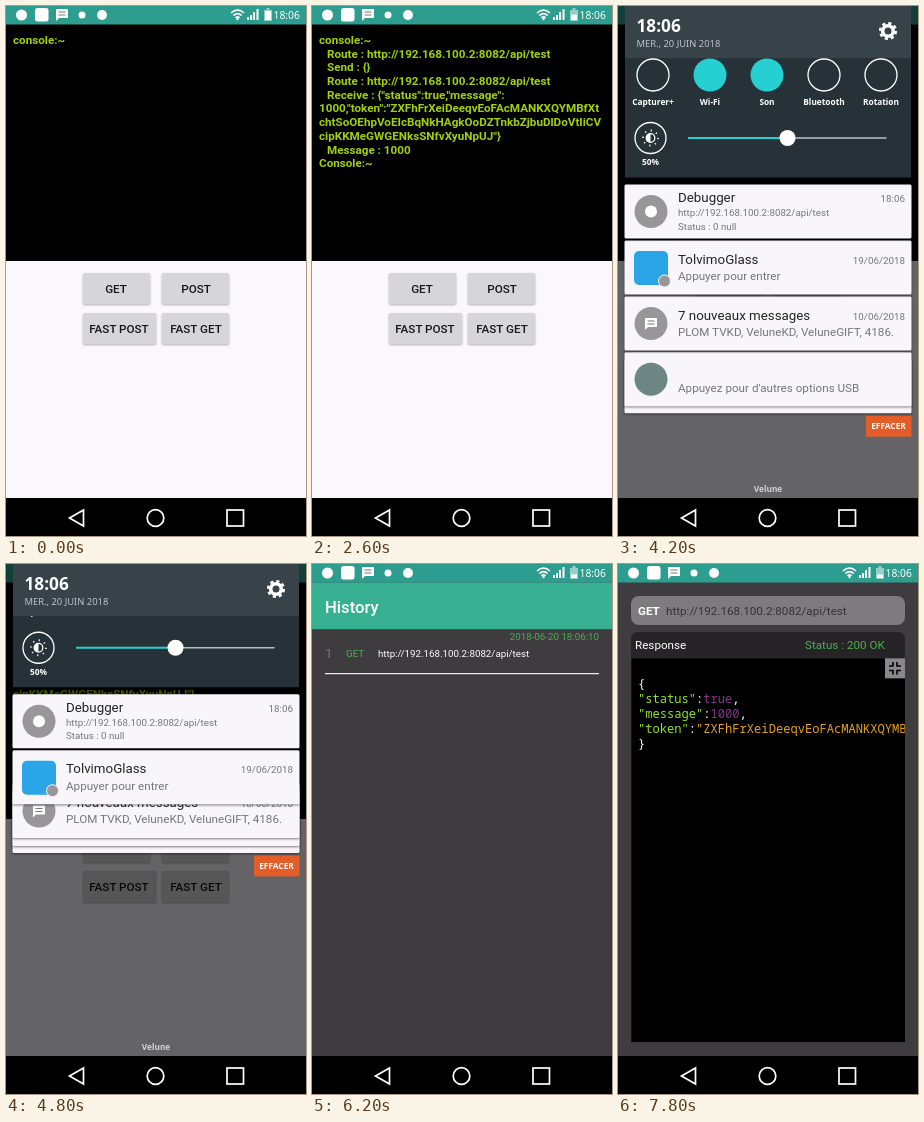
These frames come from a looping animation (300 by 530 pixels, 8 s). An HTML page:

```html
<!DOCTYPE html>
<html lang="fr">
<head>
<meta charset="utf-8">
<title>HTTP debugger</title>
<style>
@property --s { syntax: "<number>"; inherits: true; initial-value: -100; }
html, body { margin: 0; width: 100%; height: 100%; overflow: hidden; background: #000; }
body > svg { display: block; width: 100vw; height: 100vh; }
text { font: 11.67px Roboto, sans-serif; }
.b { font-weight: 700; }
.m { font-weight: 500; }
.c { text-anchor: middle; }
.e { text-anchor: end; }
.line { fill: none; stroke: #fff; }

/* console */
.console text { font-weight: 700; fill: #a2d10c; }
.btn rect { fill: #d6d6d8; filter: drop-shadow(0 1px .8px rgba(0, 0, 0, .3)); }
.btn text { font-weight: 500; fill: #161616; text-anchor: middle; }
.sent { animation: sent 8s step-end infinite; }
.got { animation: got 8s step-end infinite; }
.body { animation: body 8s step-end infinite; }
@keyframes sent { 0% { visibility: hidden } 10%, 100% { visibility: visible } }
@keyframes got { 0% { visibility: hidden } 17.5%, 100% { visibility: visible } }
@keyframes body { 0% { visibility: hidden } 97.4%, 100% { visibility: visible } }

/* status bar */
.clock { font: 500 10.3px "Noto Sans", sans-serif; fill: #fff; }
.charge { transform-origin: 262px 14px; animation: charge 1.6s steps(4) infinite; }
@keyframes charge { from { transform: scaleY(1) } to { transform: scaleY(.2) } }
.status { animation: status 8s linear infinite; }
@keyframes status {
  0%, 37% { opacity: 1 }
  40%, 64% { opacity: 0 }
  67.5% { opacity: .6 }
  70%, 100% { opacity: 1 }
}

/* windows sliding in */
.history { animation: history 8s linear infinite; }
.detail { animation: detail 8s linear infinite; }
@keyframes history {
  0%, 64.75% { transform: translateY(42px); opacity: 0 }
  67.5% { transform: translateY(7.5px); opacity: .92 }
  70%, 100% { transform: none; opacity: 1 }
}
@keyframes detail {
  0%, 88.75% { transform: translateY(42px); opacity: 0 }
  90% { transform: translateY(24.5px); opacity: .55 }
  92.5% { transform: translateY(6px); opacity: .95 }
  95%, 100% { transform: none; opacity: 1 }
}
.small text { font-size: 9.75px; }
.code text { font: 12.1px "Noto Sans Mono", "DejaVu Sans Mono", monospace; fill: #fff; white-space: pre; }
.k { fill: #8fe626; }
.n { fill: #86328c; }
.s { fill: #e5a31c; }

/* notification shade: --s is the pull distance */
.scrim { animation: scrim 8s linear infinite; }
@keyframes scrim {
  0%, 36% { opacity: 0 }
  40%, 61% { opacity: 1 }
  62.5% { opacity: .8 }
  65%, 100% { opacity: 0 }
}
.shade { animation: shade 8s linear infinite; }
@keyframes shade {
  0%, 36% { --s: -100; transform: translateY(-200px) }
  40% { --s: -90; transform: none }
  45% { --s: 0; transform: none }
  50%, 57% { --s: 26; transform: none }
  60% { --s: -22; transform: none }
  62.5% { --s: -75; transform: none }
  65%, 100% { --s: -100; transform: translateY(-200px) }
}
.shade {
  --c1: calc(153 + var(--s));
  --c2: calc(209 + var(--s));
  --c3: min(265 + 2 * var(--s), 265 + var(--s));
  --c4: max(min(283 + 2.45 * var(--s), 321 + var(--s)), 209 + var(--s));
  --c5: max(290 + 2.45 * var(--s), 209 + var(--s));
}
.panel { transform: translateY(calc(1px * var(--s))); }
.c1 { transform: translateY(calc(1px * var(--c1))); }
.c2 { transform: translateY(calc(1px * var(--c2))); }
.c3 { transform: translateY(calc(1px * var(--c3))); }
.c4 { transform: translateY(calc(1px * var(--c4))); }
.c5, .clear { transform: translateY(calc(1px * var(--c5))); }
.card { fill: #f8f6fa; filter: drop-shadow(0 1px 1.2px rgba(0, 0, 0, .5)); }
.title { font-size: 13.33px; fill: #232323; }
.sub { fill: #77757a; }
.tiny { font-size: 9.75px; }
.date { font-size: 9.8px; fill: #77757a; text-anchor: end; }
.ui text { font: 600 8.3px "Noto Sans", sans-serif; fill: #fff; }
.ui .big { font-size: 17.2px; }
.ui .day { font-size: 9.4px; font-weight: 400; fill: #bcc3c7; }
</style>
</head>
<body>
<svg viewBox="0 0 300 530">
  <defs>
    <rect id="card" class="card" x="6.5" y="-.5" width="287" height="54" rx="1.5"/>
    <g id="bubble">
      <path fill="#fff" d="M0 0H12V9H3L0 12Z"/>
      <path stroke="#777" d="M2.5 3H9.5M2.5 6H9.5"/>
    </g>
    <rect id="bar" width="300" height="18.5" fill="#2d9d90"/>
  </defs>

  <rect width="300" height="530"/>
  <use href="#bar"/>
  <rect y="255" width="300" height="237" fill="#faf8fc"/>

  <g class="console">
    <text x="7" y="38">console:~</text>
    <g class="sent">
      <text x="15" y="51.7">Route : http://192.168.100.2:8082/api/test</text>
      <text x="15" y="65.3">Send : {}</text>
    </g>
    <g class="got">
      <text x="15" y="79">Route : http://192.168.100.2:8082/api/test</text>
      <text x="15" y="92.7">Receive : {"status":true,"message":</text>
      <text x="7" y="106.3">1000,"token":"ZXFhFrXeiDeeqvEoFAcMANKXQYMBfXt</text>
      <text x="7" y="120">chtSoOEhpVoEIcBqNkHAgkOoDZTnkbZjbuDlDoVtIiCV</text>
      <text x="7" y="133.7">cipKKMeGWGENksSNfvXyuNpUJ"}</text>
      <text x="15" y="147.5">Message : 1000</text>
      <text x="7" y="161.2">Console:~</text>
    </g>
  </g>

  <g class="btn">
    <rect x="77" y="267" width="67" height="31" rx="1.5"/><text x="110" y="286.5">GET</text>
    <rect x="156" y="267" width="67" height="31" rx="1.5"/><text x="190" y="286.5">POST</text>
    <rect x="77" y="307" width="73" height="31" rx="1.5"/><text x="113" y="326.5">FAST POST</text>
    <rect x="156" y="307" width="67" height="31" rx="1.5"/><text x="190" y="326.5">FAST GET</text>
  </g>

  <g class="history small">
    <rect width="300" height="492" fill="#3f3c40"/>
    <use href="#bar"/>
    <rect y="18.5" width="300" height="46.7" fill="#38b193"/>
    <text class="m" x="13" y="48.5" fill="#fff" style="font-size:16.67px">History</text>
    <text class="e" x="287" y="76" fill="#4caf50">2018-06-20 18:06:10</text>
    <text x="13" y="93.5" fill="#98969a" style="font-size:13.3px;font-weight:300">1</text>
    <text x="34" y="93" fill="#4caf50">GET</text>
    <text x="66" y="93" fill="#fff">http://192.168.100.2:8082/api/test</text>
    <rect x="13" y="109" width="274" height="1.2" fill="#eee"/>
  </g>

  <g class="detail">
    <rect width="300" height="492" fill="#3f3c40"/>
    <use href="#bar"/>
    <rect x="13" y="32" width="274" height="29" rx="8" fill="#7d7b7e"/>
    <text class="b" x="20" y="51" fill="#fff">GET</text>
    <text x="48" y="51" fill="#353336">http://192.168.100.2:8082/api/test</text>
    <path fill="#272427" d="M13 478V75q0-7 7-7H280q7 0 7 7V478Z"/>
    <text x="17" y="84.5" fill="#fff">Response</text>
    <text x="187" y="84.5" fill="#4caf50">Status : 200 OK</text>
    <g class="body code">
      <rect x="13.5" y="94.5" width="273.5" height="383.5"/>
      <svg width="287" height="478">
        <text x="20" y="123.5">{</text>
        <text x="20" y="138.5"><tspan class="k">"status"</tspan>:<tspan class="n">true</tspan>,</text>
        <text x="20" y="153.5"><tspan class="k">"message"</tspan>:<tspan class="n">1000</tspan>,</text>
        <text x="20" y="168.5"><tspan class="k">"token"</tspan>:<tspan class="s">"ZXFhFrXeiDeeqvEoFAcMANKXQYMBfXt</tspan></text>
        <text x="20" y="183.5">}</text>
      </svg>
    </g>
    <rect x="267" y="94.3" width="20" height="20" fill="#8a888b"/>
    <path fill="none" stroke="#000" stroke-width="1.6" d="M271 102h4v-4M283 102h-4v-4M271 106.5h4v4M283 106.5h-4v4"/>
  </g>

  <g class="status" fill="#fff">
    <circle cx="15.5" cy="9" r="5.5"/>
    <rect x="29" y="2" width="13.5" height="13.5" rx="2.5"/>
    <use href="#bubble" x="50" y="3"/>
    <circle cx="76" cy="9" r="3.5"/>
    <circle cx="96" cy="9" r="5"/>
    <path class="line" stroke-width="1.6" d="M225 7q6.5-6 13 0M227.3 9.5q4.2-3.8 8.4 0M229.5 11.8q2-1.7 4 0"/>
    <circle cx="231.5" cy="13" r="1.2"/>
    <path d="M241 14v-3h2v3zM244 14v-5h2v5zM247 14v-8h2v8zM250.5 14v-11h2v11z"/>
    <path fill-opacity=".5" d="M258 4h2.5v-2h3v2H266V15H258Z"/>
    <rect class="charge" x="259" y="5" width="6" height="9"/>
    <text class="clock" x="267.5" y="13">18:06</text>
  </g>

  <g class="scrim ui">
    <rect width="300" height="492" opacity=".6"/>
    <text class="c" x="150" y="485.5" style="fill:#d2d0d4">Velune</text>
  </g>

  <g class="shade">
    <g class="clear ui">
      <rect x="248" y="56" width="45.5" height="21" fill="#e45d28"/>
      <text class="c" x="270.5" y="69.5">EFFACER</text>
    </g>
    <use class="c5" href="#card"/>
    <g class="c4">
      <use href="#card"/>
      <circle cx="33" cy="26.5" r="16.5" fill="#6d8583"/>
      <text class="sub" x="60" y="39">Appuyez pour d'autres options USB</text>
    </g>
    <g class="c3">
      <use href="#card"/>
      <circle cx="33" cy="26.5" r="16.5" fill="#989699"/>
      <use href="#bubble" x="27" y="21"/>
      <text class="title" x="60" y="22.5">7 nouveaux messages</text>
      <text class="date" x="287" y="22.5">10/06/2018</text>
      <svg width="287" height="53"><text class="sub" x="60" y="39">PLOM TVKD, VeluneKD, VeluneGIFT, 4186.</text></svg>
    </g>
    <g class="c2">
      <use href="#card"/>
      <rect x="16" y="10" width="34" height="34" rx="5" fill="#2aa5e8"/>
      <circle cx="46.5" cy="40" r="6" fill="#989699" stroke="#f8f6fa"/>
      <text class="title" x="60" y="22.5">TolvimoGlass</text>
      <text class="date" x="287" y="22.5">19/06/2018</text>
      <text class="sub" x="60" y="39">Appuyer pour entrer</text>
    </g>
    <g class="c1">
      <use href="#card"/>
      <circle cx="33" cy="26.5" r="16.5" fill="#989699"/>
      <circle cx="33" cy="26.5" r="6" fill="#fff"/>
      <text class="title" x="60" y="17">Debugger</text>
      <text class="date" x="287" y="17">18:06</text>
      <text class="sub tiny" x="60" y="31">http://192.168.100.2:8082/api/test</text>
      <text class="sub tiny" x="60" y="44.5">Status : 0 null</text>
    </g>
    <g class="panel ui">
      <rect x="7" width="286" height="145.5" fill="#263238"/>
      <g class="line" stroke-width="1.3">
        <circle cx="35" cy="43" r="16"/>
        <circle cx="206" cy="43" r="16"/>
        <circle cx="263" cy="43" r="16"/>
        <circle cx="32.5" cy="106" r="15.5"/>
        <circle cx="32.5" cy="106" r="4.3"/>
        <circle cx="32.5" cy="106" r="7.5" stroke-width="1.8" stroke-dasharray="1.2 4.69"/>
      </g>
      <path fill="#fff" d="M32.5 101.7a4.3 4.3 0 0 0 0 8.6Z"/>
      <g fill="#25cfd2"><circle cx="92" cy="43" r="16.5"/><circle cx="149" cy="43" r="16.5"/></g>
      <g class="c">
        <text x="35" y="73">Capturer+</text>
        <text x="92" y="73">Wi-Fi</text>
        <text x="149" y="73">Son</text>
        <text x="206" y="73">Bluetooth</text>
        <text x="263" y="73">Rotation</text>
        <text x="32.5" y="133">50%</text>
      </g>
      <path stroke="#b9c0c3" stroke-width="1.5" d="M170 106H268.5"/>
      <path stroke="#25cfd2" stroke-width="2" d="M70 106H170"/>
      <circle cx="169.5" cy="106" r="8" fill="#fff"/>
    </g>
    <g class="ui">
      <rect x="7" width="286" height="52" fill="#384249"/>
      <text class="big" x="18.5" y="25.5">18:06</text>
      <text class="day" x="18.5" y="40.5">MER., 20 JUIN 2018</text>
      <g class="line">
        <circle cx="270" cy="25" r="5.3" stroke-width="3.6"/>
        <circle cx="270" cy="25" r="7.8" stroke-width="2.6" stroke-dasharray="3.2 2.926"/>
      </g>
    </g>
  </g>

  <g class="line" stroke-width="1.7">
    <path d="M63.5 512 77.5 504V520Z"/>
    <circle cx="149.5" cy="512" r="8.3"/>
    <rect x="221" y="504" width="16.5" height="16"/>
  </g>
</svg>
</body>
</html>
```
